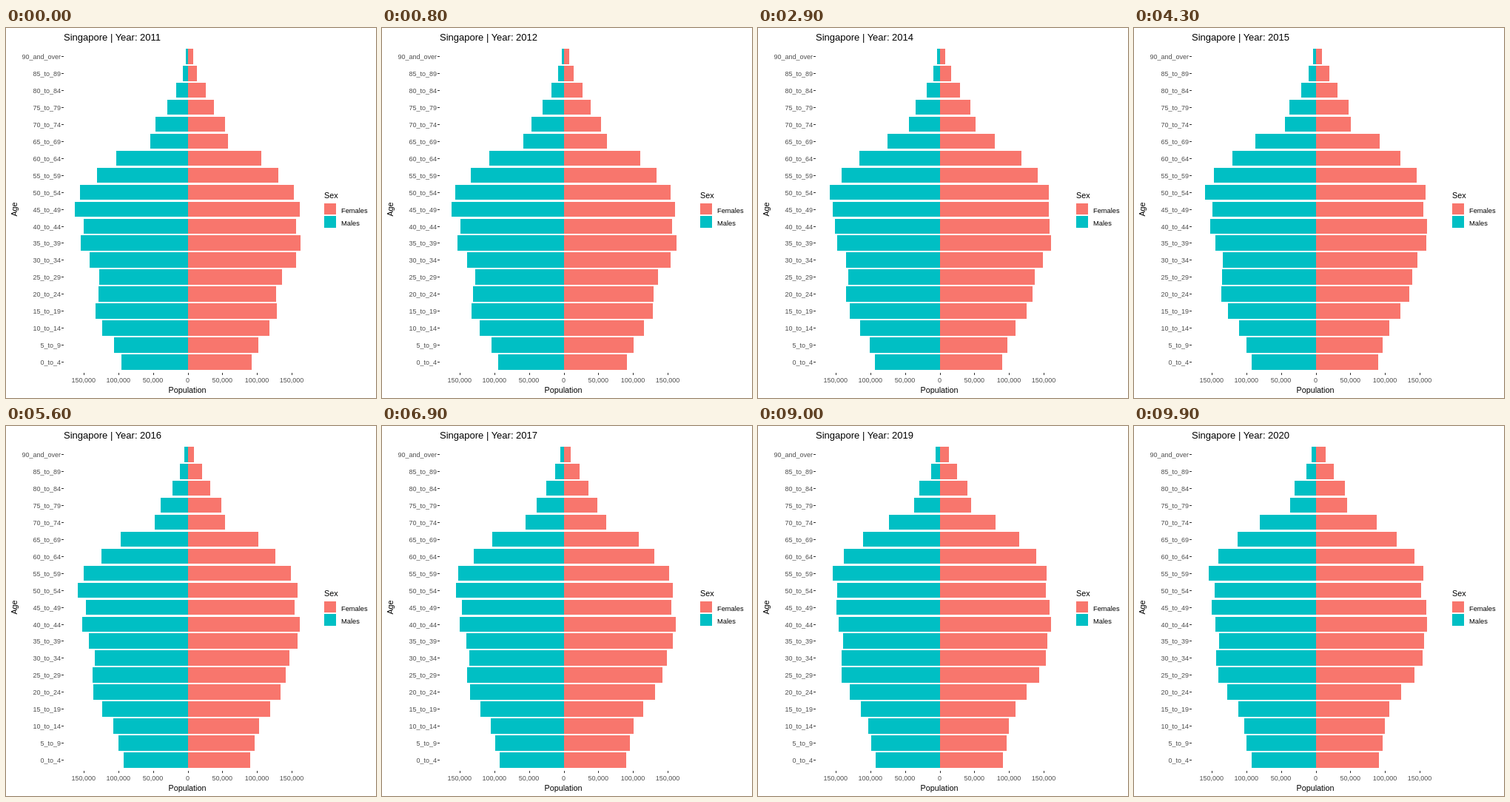
Write an HTML page that moves like this. It is 500 px wide and 500 px high and loops after 10 s.

```html
<!DOCTYPE html>
<html lang="en">
<head>
<meta charset="utf-8">
<title>Population pyramid</title>
<style>
  html, body { margin: 0; width: 100%; height: 100%; overflow: hidden; background: #fff; }
  svg { display: block; width: 500px; height: 500px; font-family: "Liberation Sans", Arial, sans-serif; }
  rect, line { shape-rendering: crispEdges; }
  line { stroke: #333; stroke-width: 1; }
  .title { font-size: 13px; }
  .name { font-size: 10.8px; }
  .axis { font-size: 9px; fill: #4d4d4d; }
  .key { font-size: 9.3px; }
  .males { fill: #00bfc4; }
  .females { fill: #f8766d; }
</style>
</head>
<body>
<svg id="chart" viewBox="0 0 500 500">
  <text id="title" class="title" x="78" y="17"></text>
  <text class="name" x="245" y="493" text-anchor="middle">Population</text>
  <text class="name" transform="translate(15 245) rotate(-90)" text-anchor="middle">Age</text>
  <text class="name" x="430" y="230">Sex</text>
  <rect class="females" x="430" y="237" width="16" height="15"/>
  <rect class="males" x="430" y="254" width="16" height="16"/>
  <text class="key" x="453" y="249.5">Females</text>
  <text class="key" x="453" y="267">Males</text>
</svg>
<script>
const LOOP = 10000, STEP = 100, STEPS_PER_YEAR = 11;
const FIRST_YEAR = 2011, YEARS = 9, GROUP_YEARS = 5;
const ZERO = 246, TICK_GAP = 46.85;
const ROW = 22.96, FIRST_TOP = 28.42, BAR = 20.62;

// Bar lengths in px in the first year, youngest group first. Later years follow
// by aging these cohorts, with arrivals of young adults and losses of older ones.
const sexes = {
  males: {
    start: [90, 100, 116, 125, 121, 120, 133, 145, 141, 153, 146, 123, 97, 51, 44, 28, 16, 7, 3],
    arrivals: 14.5, losses: 12
  },
  females: {
    start: [86, 95, 110, 120, 119, 127, 146, 152, 146, 151, 143, 122, 99, 54, 50, 35, 24, 12, 7],
    arrivals: 24, losses: 8.5
  }
};
const GROUPS = sexes.males.start.length;

const chart = document.getElementById("chart");
const title = document.getElementById("title");

const clamp = (x, low, high) => Math.min(high, Math.max(low, x));
const bell = (x, mid, width) => Math.exp(-(((x - mid) / width) ** 2));

function add(tag, attrs, text = "") {
  const el = document.createElementNS("http://www.w3.org/2000/svg", tag);
  for (const name in attrs) el.setAttribute(name, attrs[name]);
  el.textContent = text;
  return chart.appendChild(el);
}

function ageLabel(group) {
  const age = GROUP_YEARS * group;
  return group === GROUPS - 1 ? `${age}_and_over` : `${age}_to_${age + 4}`;
}

// Catmull-Rom curve through the points, extended as a line below the first.
function curve(points, x) {
  if (x < 0) return points[0] + x * (points[1] - points[0]);
  const last = points.length - 1;
  const i = Math.min(Math.floor(x), last - 1), s = x - i;
  const [a, b, c, d] = [-1, 0, 1, 2].map(k => points[clamp(i + k, 0, last)]);
  return b + s / 2 * (c - a + s * (2 * a - 5 * b + 4 * c - d + s * (3 * (b - c) + d - a)));
}

function barLength({ start, arrivals, losses }, group, years) {
  const cohort = group - years / GROUP_YEARS;
  const finalAge = cohort + YEARS / GROUP_YEARS;
  const base = curve(start, cohort);
  const gain = 15 * bell(finalAge, 0, 2) + arrivals * bell(finalAge, 6.1, 1.35);
  const loss = Math.min(losses * clamp((finalAge - 7) / 6, 0, 1), 0.55 * base);
  return Math.round(base + years / YEARS * (gain - loss));
}

const bars = Array.from({ length: GROUPS }, (_, group) => {
  const top = FIRST_TOP + ROW * (GROUPS - 1 - group);
  const y = Math.floor(top), height = Math.floor(top + BAR) - y;
  const mid = Math.floor(top + BAR / 2 - 0.3) + 0.5;
  add("line", { x1: 75, x2: 78, y1: mid, y2: mid });
  add("text", { class: "axis", x: 74, y: mid + 3.5, "text-anchor": "end" }, ageLabel(group));
  return {
    males: add("rect", { class: "males", y, height }),
    females: add("rect", { class: "females", x: ZERO, y, height })
  };
});

for (let k = -3; k <= 3; k++) {
  const x = ZERO + k * TICK_GAP, tick = Math.floor(x) + 0.5;
  add("line", { x1: tick, x2: tick, y1: 466, y2: 469 });
  add("text", { class: "axis", x: x - 0.6, y: 479, "text-anchor": "middle" },
    k ? Math.abs(k) * 50 + ",000" : "0");
}

function draw() {
  const years = Math.floor(performance.now() % LOOP / STEP) / STEPS_PER_YEAR;
  title.textContent = "Singapore | Year: " + Math.round(FIRST_YEAR + years);
  bars.forEach(({ males, females }, group) => {
    const left = barLength(sexes.males, group, years);
    males.setAttribute("x", ZERO - left);
    males.setAttribute("width", left);
    females.setAttribute("width", barLength(sexes.females, group, years));
  });
  requestAnimationFrame(draw);
}
draw();
</script>
</body>
</html>
```
